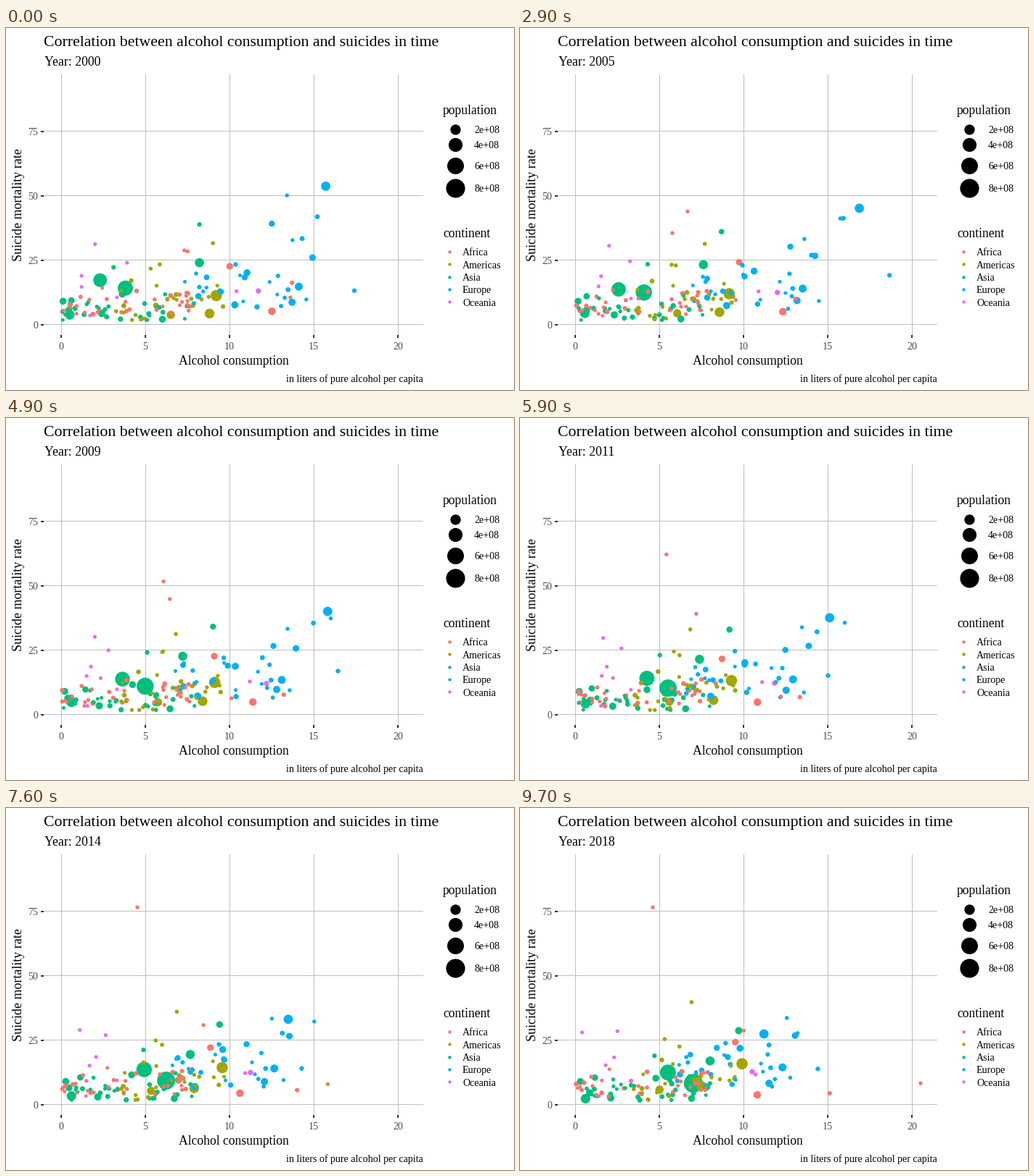
These frames come from a looping animation (700x500 px, 10000 ms). A matplotlib script:

```python
import numpy as np
import matplotlib.pyplot as plt
from matplotlib.animation import FuncAnimation

W, H, DPI = 700, 500, 100
PT = 72 / DPI                      # points per pixel
FRAMES, LAST = 100, 97             # motion stops at LAST, then holds
COLORS = {"Africa": "#F8766D", "Americas": "#A3A500", "Asia": "#00BF7D",
          "Europe": "#00B0F6", "Oceania": "#E76BF3"}
AF, AM, AS, EU, OC = COLORS
GRID, TICK, LABEL = "#BEBEBE", "#333333", "#4D4D4D"

plt.rcParams["font.family"] = "Liberation Serif"
rng = np.random.default_rng(18)
time = np.minimum(np.arange(FRAMES), LAST) / LAST
dots = []                          # (radius, x, y, color), each over all frames


def px(liters):
    return 76.3 + 23.2 * liters


def py(rate):
    return 408.6 - 3.547 * rate


def over_time(values):
    """Straight moves between values spread evenly over the loop."""
    values = np.atleast_1d(values)
    return np.interp(time, np.linspace(0, 1, len(values)), values)


def trail(place, r, *points):
    """A dot that stands out, led through a few data points."""
    x, y = np.transpose(points)
    dots.append((over_time(r), px(over_time(x)), py(over_time(y)), COLORS[place]))


def crowd(place, n, x0, x1, skew, rate, shape, drift=0, grow=0.3):
    """Small dots that wander from year to year in the dense area."""
    years = np.linspace(0, 1, 19)
    for _ in range(n):
        x = x0 + (x1 - x0) * rng.random() ** skew + drift * years
        y = rng.gamma(shape, rate / shape)
        x = np.maximum(x + rng.normal(0, 0.2, 19), 0.05)
        y = np.maximum(y + rng.normal(0, 0.7, 19), 1.5)
        r = min(2.5 + rng.exponential(grow), 4.8)
        trail(place, r, *zip(x, y))


trail(AS, (10.5, 13), (3.8, 13.9), (4.1, 12), (5.8, 9.6), (7, 8))
trail(AS, (9.5, 11), (2.3, 17), (2.6, 13), (4.6, 14), (5.5, 12.2))
trail(AS, 6.3, (8.2, 23.8), (7.2, 22.5), (8, 16.7))
trail(AS, (3.2, 5), (8.2, 38.7), (9, 34), (9.7, 28.5))
trail(AS, 6.6, (0.5, 3.5), (0.6, 4.5), (0.6, 2))
trail(AS, 5, (2.4, 4), (2.1, 2.3))
trail(AS, 4.8, (6, 1.8), (6.9, 2.1))
trail(AS, 4.8, (0.1, 8.8), (0.3, 8.7))
trail(AS, 3.2, (3.1, 22), (5.1, 24), (4.7, 18.7))

trail(AM, 7.8, (9.2, 11), (9.1, 12.2), (9.9, 15.6))
trail(AM, 6.7, (8.8, 4), (8.4, 4.9), (7.5, 6.9))
trail(AM, 5.7, (6.5, 3.5), (5, 5.5))
trail(AM, 2.8, (9, 31.4), (6.8, 31), (6.9, 39.6))
trail(AM, 2.8, (5.3, 21.5), (6, 24), (5.3, 25.2))

trail(EU, 6.4, (15.7, 53.6), (17, 44), (14.7, 36), (11.2, 27.2))
trail(EU, 2.8, (13.4, 50), (16, 40), (16, 34.5), (13.2, 27.5))
trail(EU, 3.4, (15.2, 41.7), (16, 41), (14, 30), (11.5, 22.9))
trail(EU, 4.2, (12.5, 39), (12.8, 29), (12.4, 24), (8.4, 21.8))
trail(EU, 3.4, (14.3, 33.2), (14, 26), (10, 18), (9.2, 15.4))
trail(EU, 3.2, (17.4, 12.9), (18.8, 19.6), (14.2, 13.9), (14.4, 13.6))
trail(EU, 5.5, (14.1, 14.5), (13.1, 13.2), (12.3, 14.2))
trail(EU, 5, (13.7, 8.4), (12.8, 9.5), (11.5, 8))
trail(EU, 5, (10.3, 7.4), (8.1, 6.9), (7.8, 6.6))

trail(AF, 4.6, (10, 22.4), (9.7, 24.2), (8.5, 20.8), (9.5, 24))
trail(AF, 5.2, (12.5, 4.9), (12.3, 4.7), (10.5, 4.5), (10.8, 3.5))
trail(AF, 2.7, (7.3, 28.6), (6.8, 42), (6.1, 51), (4.5, 76.5), (4.6, 76.5))
trail(AF, 2.7, (7.5, 28.2), (5.6, 33), (6.4, 45), (8.2, 31), (10, 28.5))
trail(AF, 3.1, (13.7, 16), (13, 9), (13.4, 6), (15.1, 4.1))
trail(AF, 2.7, (13.6, 10.3), (9.4, 10), (10, 6), (15.1, 7.6), (20.5, 8))

trail(OC, 2.6, (2, 31), (2, 30), (0.4, 27.8))
trail(OC, 2.6, (3.9, 23.8), (2.8, 24.7), (2.5, 28.3))
trail(OC, 2.6, (1.2, 18.7), (2.3, 18.1))
trail(OC, 2.6, (1.2, 14.4), (1.8, 15))
trail(OC, 2.7, (10.4, 12.7), (11.2, 12.6), (10.7, 11.4))
trail(OC, 3.7, (11.7, 12.8), (12.2, 11.8), (10.5, 12.5))
trail(OC, 2.5, (3.3, 10.3), (3.3, 8.8))
trail(OC, 2.5, (1.7, 3.2), (1.4, 3))

crowd(EU, 25, 6.8, 15.2, 0.75, 14.5, 9, -1.5, 0.7)
crowd(AF, 36, 0.1, 8, 1.5, 7.8, 6)
crowd(AS, 30, 0.05, 7.5, 1.6, 6, 5, 0.6, 0.6)
crowd(AM, 23, 3.4, 9.4, 1, 7, 4, 0.2, 0.4)

# Large dots lie below small ones
dots.sort(key=lambda d: -d[0].max())
R, X, Y = (np.array([d[k] for d in dots]).T for k in range(3))

fig = plt.figure(figsize=(W / DPI, H / DPI), dpi=DPI, facecolor="white")
ax = fig.add_axes([0, 0, 1, 1])
ax.set_xlim(0, W)
ax.set_ylim(H, 0)
ax.axis("off")


def area(r):
    return (2 * r * PT) ** 2


def line(x, y, color, width):
    ax.plot(x, y, color=color, lw=width * PT, snap=False,
            solid_capstyle="butt", zorder=1)


def text(x, y, s, size, **kw):
    return ax.text(x, y, s, fontsize=size * PT, va="baseline", **kw)


def discs(x, y, r, color):
    return ax.scatter(x, y, s=area(r), c=color, linewidths=0, snap=False, zorder=3)


for i in range(5):
    gx = int(px(5 * i))
    line([gx + .5] * 2, [64, 424], GRID, 1)
    line([gx] * 2, [424, 428], TICK, 2)
    text(gx, 444, str(5 * i), 14, color=LABEL, ha="center")
for i in range(4):
    gy = int(py(25 * i) + .4)
    line([52, 575], [gy + .5] * 2, GRID, 1)
    line([48, 52], [gy + 1] * 2, TICK, 2)
    text(44, gy + 6, str(25 * i), 14, color=LABEL, ha="right")

text(52, 25, "Correlation between alcohol consumption and suicides in time", 21.8)
year = text(53, 52, "", 17.7)
text(314, 465, "Alcohol consumption", 17.6, ha="center")
text(22, 244, "Suicide mortality rate", 18, ha="center", rotation=90,
     rotation_mode="anchor")
text(575, 489, "in liters of pure alcohol per capita", 14, ha="right")

text(602, 119, "population", 17.6)
for n, y in zip((2, 4, 6, 8), (139.5, 161, 189.5, 221)):
    discs([619], [y], 1.2 + 4.2 * n ** .5, "black")
    text(645, y + 5.5, f"{n}e+08", 14)
text(602, 289, "continent", 17.6)
for i, (name, color) in enumerate(COLORS.items()):
    y = 309 + 17.25 * i
    discs([611], [y], 2.2, color)
    text(629, y + 5.5, name, 14)

cloud = discs(X[0], Y[0], R[0], [d[3] for d in dots])


def draw(i):
    cloud.set_offsets(np.column_stack([X[i], Y[i]]))
    cloud.set_sizes(area(R[i]), DPI)
    year.set_text(f"Year: {2000 + round(18 * i / (FRAMES - 1))}")
    return cloud, year


anim = FuncAnimation(fig, draw, frames=FRAMES, interval=100, repeat=True,
                     init_func=lambda: draw(0))
plt.show()
```
